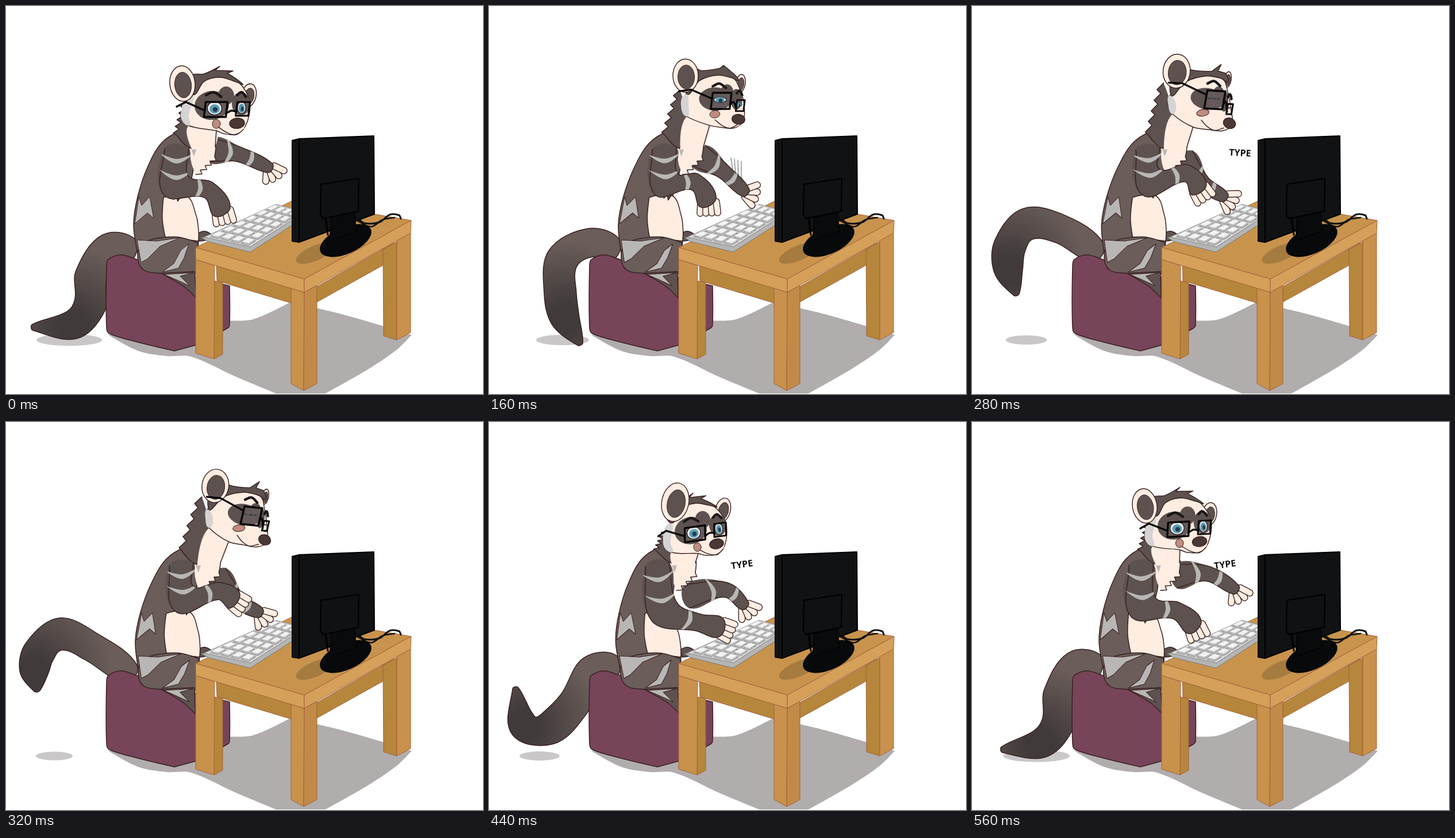
Write an HTML page with a canvas that moves like this. It is 830 by 675 pixels and loops after 0.64 s.

```html
<!DOCTYPE html>
<html lang="en">
<head>
<meta charset="utf-8">
<title>Typing</title>
<style>
html, body { margin: 0; width: 100%; height: 100%; overflow: hidden; background: #fff; }
canvas { display: block; }
</style>
</head>
<body>
<canvas id="stage" width="830" height="675"></canvas>
<script>
const ctx = document.getElementById('stage').getContext('2d');
const INK = '#3a2222', FUR = '#6a5d5a', DARK = '#5d5250', CREAM = '#ffede2', STRIPE = '#b9b7b6';
const BLACK = '#080707', WOOD_LINE = '#a5603a', LEG = '#c8914c', EDGE = '#d5a05a', APRON = '#b5863c';

// Points are "x,y"; a trailing ! marks a sharp corner.
const pts = s => s.split(' ').map(p => {
  const [x, y] = p.split(',').map(parseFloat);
  return { x, y, sharp: p.endsWith('!') };
});
const at = (x, y, sharp = false) => ({ x, y, sharp });
const mix = (a, b, k) =>
  typeof a === 'number' ? a + (b - a) * k :
  Array.isArray(a) ? a.map((v, i) => mix(v, b[i], k)) :
  typeof a === 'object' ? Object.fromEntries(Object.keys(a).map(n => [n, mix(a[n], b[n], k)])) : a;

// Two views of the head; ovals are [x, y, rx, ry, turn], lenses [x, y, width, height].
const frontView = {
  face: pts('322,155 345,130 372,124 402,131 418,150 425,172 417,208 400,223 378,222 366,217 318,208 304,190'),
  crown: pts('322,122 345,118 372,105! 364,112! 395,113! 385,117! 412,136 400,132 372,124 345,131 324,154'),
  ear: [307, 135, 22, 31, -.1], far: [422, 156, 13, 21, .25],
  masks: [[358, 173, 30, 25, -.1], [409, 170, 16, 20, 0], [383, 156, 14, 16, 0]],
  muzzle: [393, 206, 23, 17, 0], nose: [402, 204, 13, 9, -.1], tongue: [366, 205, 7, 8, 0],
  mouth: pts('370,211 384,220 400,224 413,215'),
  lensL: [365, 180, 38, 26], lensR: [412, 179, 22, 24],
  temple: pts('297,175! 313,167! 346,182!'), nape: at(314, 168)
};
const sideView = {
  face: pts('338,160 360,136 395,122 430,126 440,148 448,180 450,206 434,217 410,216 382,213 345,192 336,175'),
  crown: pts('352,100 372,112 410,113! 426,100! 421,112! 434,115! 440,130 428,125 400,122 365,134 340,158'),
  ear: [348, 116, 24, 30, .05], far: [439, 126, 6, 14, .1],
  masks: [[405, 162, 30, 19, .1], [435, 165, 7, 18, 0], [424, 152, 10, 13, 0]],
  muzzle: [428, 202, 21, 13, .2], nose: [446, 203, 11, 9, .3], tongue: [398, 187, 11, 6, -.2],
  mouth: pts('396,200 406,210 420,217 436,212'),
  lensL: [418, 163, 32, 32], lensR: [445, 178, 9, 18],
  temple: pts('335,137! 360,137! 403,155!'), nape: at(326, 138)
};

// head: nose position, tilt in degrees, size, turn to the side, nod
// arms: joints, then the angle of the hand in degrees
const pose = (time, lean, [x, y, tilt, size, turn, nod], near, nearHand, far, farHand, tail, shadow) =>
  ({ time, lean, head: { x, y, tilt, size, turn, nod }, near: pts(near), nearHand, far: pts(far), farHand, tail: pts(tail), shadow });
const poses = [
  pose(0, 0, [402, 204, 0, 1, 0, 0], '296,312 352,320 377,357', 78, '355,250 405,258 460,282', 60,
    '222,422 180,420 148,470 146,520 115,555 46,559', [110, 57]),
  pose(80, 5, [410, 203, 6, .96, .08, 0], '303,310 355,312 378,352', 80, '358,255 408,260 446,278', 20,
    '222,422 175,420 138,460 124,510 112,556 78,588', [108, 53]),
  pose(160, 9, [434, 197, 0, .95, .6, 0], '309,310 358,306 382,341', 88, '365,260 408,288 447,325', 15,
    '222,422 175,412 128,440 124,500 133,545 159,588', [128, 46]),
  pose(240, 11, [446, 203, 0, 1, 1, 0], '313,305 375,288 393,327', 80, '368,262 400,305 438,334', 15,
    '222,420 160,385 100,389 74,435 78,485 101,536', [105, 40]),
  pose(320, 9, [450, 205, 6, .97, 1, 0], '311,308 370,294 398,310', 35, '366,268 405,312 443,333', 50,
    '218,438 150,392 95,369 58,400 49,435 54,468', [84, 32]),
  pose(440, -5, [396, 212, -8, .94, 0, 1], '305,330 365,349 404,358', 25, '345,303 412,292 446,320', 55,
    '222,422 180,430 148,490 102,534 60,528 46,463', [88, 35]),
  pose(560, -3, [396, 208, -3, .97, 0, 0], '298,322 355,328 388,356', 68, '355,268 410,264 460,292', 62,
    '222,422 182,422 152,475 149,525 118,560 52,570', [112, 58])
];

function trace(list, closed) {
  const n = list.length;
  const get = i => closed ? list[(i + n) % n] : list[Math.max(0, Math.min(n - 1, i))];
  const handle = (i, reach) => {
    const p = get(i), a = get(i - 1), b = get(i + 1);
    const k = p.sharp ? 0 : reach / 3 / (Math.hypot(b.x - a.x, b.y - a.y) || 1);
    return [p.x + (b.x - a.x) * k, p.y + (b.y - a.y) * k];
  };
  ctx.beginPath();
  ctx.moveTo(list[0].x, list[0].y);
  for (let i = 0; i < (closed ? n : n - 1); i++) {
    const a = get(i), b = get(i + 1), d = Math.hypot(b.x - a.x, b.y - a.y);
    ctx.bezierCurveTo(...handle(i, d), ...handle(i + 1, -d), b.x, b.y);
  }
}
function paint(fill, stroke, width) {
  if (fill) { ctx.fillStyle = fill; ctx.fill(); }
  if (stroke) { ctx.strokeStyle = stroke; ctx.lineWidth = width; ctx.stroke(); }
}
const list = p => typeof p === 'string' ? pts(p) : p;
function line(points, color = INK, width = 1.5) {
  trace(list(points), false);
  paint(null, color, width);
}
function shape(points, fill, stroke = INK, width = 1.5) {
  trace(list(points), true);
  paint(fill, stroke, width);
}
function openShape(points, fill) {
  shape(points, fill, null);
  line(points);
}
function poly(s, fill, stroke, width = 1) {
  shape(pts(s).map(p => ({ ...p, sharp: true })), fill, stroke, width);
}
function oval([x, y, rx, ry, turn = 0], fill, stroke, width = 1.5) {
  ctx.beginPath();
  ctx.ellipse(x, y, rx, ry, turn, 0, 7);
  paint(fill, stroke, width);
}
function within(matrix, draw) {
  ctx.save();
  ctx.transform(matrix.a, matrix.b, matrix.c, matrix.d, matrix.e, matrix.f);
  draw();
  ctx.restore();
}
// Pointed tufts from a to b.
function fur(a, b, count, size) {
  const dx = b.x - a.x, dy = b.y - a.y, len = Math.hypot(dx, dy), tufts = [];
  for (let i = 0; i < count; i++) {
    const root = i / count, tip = (i + .75) / count;
    tufts.push(at(a.x + dx * root, a.y + dy * root, true),
      at(a.x + dx * tip - dy / len * size, a.y + dy * tip + dx / len * size, true));
  }
  return [...tufts, { ...b, sharp: true }];
}
function normal(joints, i) {
  const a = joints[Math.max(0, i - 1)], b = joints[Math.min(joints.length - 1, i + 1)];
  const len = Math.hypot(b.x - a.x, b.y - a.y);
  return at((b.y - a.y) / len, (a.x - b.x) / len);
}
// Outline of a limb: its joints widened to both sides.
function limb(joints, widths) {
  const side = dir => joints.map((p, i) => {
    const n = normal(joints, i), w = widths[i] / 2 * dir;
    return at(p.x + n.x * w, p.y + n.y * w);
  });
  return [...side(1), ...side(-1).reverse()];
}

function drawTail(joints) {
  const outline = limb(joints, [36, 50, 56, 56, 50, 10]);
  const { x, y } = joints[4], shade = ctx.createRadialGradient(x, y, 25, x, y, 135);
  shade.addColorStop(0, '#403a3a');
  shade.addColorStop(1, FUR);
  const [root, bend] = outline;
  shape(fur(mix(root, bend, .1), mix(root, bend, .75), 3, 9), FUR);
  shape(outline, shade);
}
function drawTorso() {
  shape('302,218 270,239 246,281 229,332 222,380 228,425 236,457! 290,462! 330,462! 335,405 330,375 315,335 325,290 330,215', FUR);
  shape('274,333! 314,330 331,365 335,390 335,409! 277,402! 272,370', CREAM);
  poly('231,332 236,347 250,332 257,369 246,360 224,379 228,354', STRIPE);
  shape('229,430 240,412 265,404 300,402 334,412! 334,466! 270,465 238,458', FUR);
  poly('228,407 262,409 303,403 268,418 246,440 235,446', STRIPE);
  poly('318,414 304,425 292,448 272,463 300,456 310,438', STRIPE);
  shape('270,465! 328,462! 331,508! 312,490 290,476', DARK);
  poly('275,467 326,464 303,470 320,487 296,476', STRIPE);
}
function drawTable() {
  poly('330,420 500,338 705,373 519,475', '#c8934d', WOOD_LINE);
  oval([538, 430, 36, 13, -.4], '#a57b40');
  poly('366,452 497,490 497,517 367,478', APRON, WOOD_LINE);
  poly('541,488 675,412 674,441 541,515', APRON, WOOD_LINE);
  poly('362,478 377,481 377,606 362,614', APRON, WOOD_LINE);
  poly('330,441 363,452 362,614 330,604', LEG, WOOD_LINE);
  poly('496,491 519,498 518,669 496,657', LEG, WOOD_LINE);
  poly('519,498 541,486 541,657 518,669', '#c18a48', WOOD_LINE);
  poly('656,424 680,410 680,581 657,574', APRON, WOOD_LINE);
  poly('680,408 704,394 704,568 680,581', LEG, WOOD_LINE);
  poly('330,420 519,475 519,498 330,441', EDGE, WOOD_LINE);
  poly('519,475 705,373 704,395 519,498', EDGE, WOOD_LINE);
}
function drawKeyboard() {
  poly('340,403 347,402 425,419 520,358 520,367 425,428 352,410', '#b5b5b5', '#777');
  poly('345,402 470,345 520,358 425,419', '#dcdcdc', '#888');
  const spot = (u, v) => `${347 + 123 * u + 78 * v - 28 * u * v},${402 - 57 * u + 17 * v - 4 * u * v}`;
  for (let i = 0; i < 6; i++) for (let j = 0; j < 4; j++) {
    const u = .03 + i * .16, v = .07 + j * .23;
    const key = [spot(u, v), spot(u + .12, v), spot(u + .12, v + .17), spot(u, v + .17)].join(' ');
    poly(key, '#c4c4c4', '#a4a4a4', 2);
    within(new DOMMatrix().translate(0, -3), () => poly(key, '#f3f3f3', '#a4a4a4', .8));
  }
}
function drawMonitor() {
  line('612,370 625,378 650,376 668,363 684,364 687,370', '#111', 3);
  line('612,374 635,384 655,372 676,368', '#111', 2.5);
  poly('498,234 510,231 640,226 641,362 510,411 498,409', '#111214', '#000', 2);
  line('510,232! 510,411!', '#000', 2);
  oval([591, 408, 48, 23, -.42], '#08090a');
  poly('566,362 606,354 610,392 563,408', '#090a0b', '#000');
  poly('548,310 614,300 613,357 552,370 547,364', '#101113', '#000', 2);
  line('556,368! 560,398!', '#000', 3);
}
function drawBib() {
  const edge = [...fur(at(330, 293), at(363, 262), 4, 7), at(365, 242), at(360, 222)];
  shape([at(318, 220, true), at(322, 270), ...edge], CREAM, null);
  line(edge);
  shape('296,222! 312,228 327,262! 332,240 322,222!', STRIPE, null);
}
function drawHand(wrist, degrees, spacing, fan, length) {
  const aim = degrees * Math.PI / 180;
  for (const i of [1.5, .5, -.5, -1.5]) {
    const a = aim + i * fan;
    const base = at(wrist.x - Math.sin(aim) * i * spacing, wrist.y + Math.cos(aim) * i * spacing);
    const finger = [base, at(base.x + Math.cos(a) * length, base.y + Math.sin(a) * length)];
    line(finger, INK, 12.5);
    line(finger, CREAM, 9.8);
  }
}
// Pale bands lie across the arm at the given joint positions.
function drawArm(joints, widths, bands) {
  const outline = limb(joints, widths);
  openShape(outline, DARK);
  ctx.save();
  trace(outline, true);
  ctx.clip();
  for (const band of bands) {
    const i = Math.floor(band), p = mix(joints[i], joints[i + 1], band - i), n = normal([joints[i], joints[i + 1]], 0);
    const spot = (across, along) => at(p.x + n.x * across - n.y * along, p.y + n.y * across + n.x * along);
    shape([{ ...spot(30, -8), sharp: true }, spot(0, 2), { ...spot(-30, -8), sharp: true }, spot(0, 10)], STRIPE, null);
  }
  ctx.restore();
}
function drawEye([x, y, w, h], open) {
  const rx = w * .33, ry = Math.max(.5, h * .44 * open), eye = [x - 2, y - 2, rx, ry];
  oval(eye, '#fff', '#1c1717', 1.5);
  ctx.save();
  oval(eye);
  ctx.clip();
  oval([x - 2, y - 1, rx * .7, 8], '#4d9db8');
  oval([x - 1, y, rx * .32, 4], '#16303c');
  ctx.restore();
}
function drawLens([x, y, w, h], width) {
  const corner = (i, j) => `${x + i * w / 2 - j * h * .06},${y + j * h / 2}`;
  poly([corner(-1, -1), corner(1, -1), corner(1, 1), corner(-1, 1)].join(' '), 'rgba(160,150,165,.12)', BLACK, width);
}
function drawBrow([x, y, w, h]) {
  const top = y - h / 2;
  line([at(x - w * .45, top - 12), at(x - w * .1, top - 17), at(x + w * .25, top - 9)], '#1c1717', 4.5);
}
function drawEar(ear) {
  const [x, y, rx, ry, turn] = ear;
  oval(ear, CREAM, INK);
  oval([x + rx * .05, y + ry * .08, rx * .66, ry * .72, turn], DARK, INK, 1);
}
function drawHead({ x, y, tilt, size, turn, nod }, lean) {
  const h = mix(frontView, sideView, turn), [noseX, noseY] = h.nose;
  const matrix = new DOMMatrix().translate(x, y).rotate(tilt).scale(size).translate(-noseX, -noseY);
  const onHead = p => { const q = matrix.transformPoint(p); return at(q.x, q.y); };
  h.ear = mix(h.ear, [h.ear[0] + 30, h.ear[1] - 18, 25, 36, .35], nod);
  h.far = mix(h.far, [h.far[0], h.far[1] - 12, 14, 23, .4], nod);

  const throat = onHead(h.face[9]), cheek = onHead(h.face[10]);
  const nape = fur(onHead(h.nape), at(298 + lean, 226), 5, 8);
  openShape([...nape, at(326 + lean, 246), cheek], DARK);
  shape([throat, at(364 + lean, 245, true), at(324 + lean, 250, true), cheek], CREAM, null);
  line([throat, at(364 + lean, 245)]);

  within(matrix, () => {
    drawEar(h.far);
    shape(h.face, CREAM);
    shape([h.face[0], h.face[11], h.face[10], at(h.face[11].x + 14, h.face[11].y)], '#d5d3d3', null);
    shape(h.crown, DARK);
    drawEar(h.ear);
    h.masks.forEach(m => oval(m, DARK));
    oval(h.muzzle, CREAM);
    drawEye(h.lensL, 1 - turn);
    drawEye(h.lensR, 1 - turn);
    drawBrow(h.lensL);
    drawBrow(h.lensR);
    oval(h.tongue, '#bd8d7e', INK, 1);
    line(h.mouth);
    oval(h.nose, '#4a3836', INK);
    drawLens(h.lensL, 3.6);
    drawLens(h.lensR, 3);
    line(h.temple, BLACK, 3.4);
    const [lx, ly, lw] = h.lensL, [rx, ry, rw] = h.lensR;
    line([at(lx + lw / 2, ly + 6), at((lx + lw / 2 + rx - rw / 2) / 2, ly + 2), at(rx - rw / 2, ry + 5)], BLACK, 3.4);
  });
}
function drawWord(x, y, degrees) {
  within(new DOMMatrix().translate(x, y).rotate(degrees), () => {
    ctx.fillStyle = '#111';
    ctx.font = '700 16px "Open Sans", sans-serif';
    ctx.fillText('TYPE', 0, 0);
  });
}

function draw(t) {
  const next = poses.findIndex(p => p.time > t);
  const b = poses.at(next), a = next < 0 ? b : poses[next - 1];
  const p = a === b ? a : mix(a, b, (t - a.time) / (b.time - a.time));
  // Shears everything above the hips.
  const leaning = new DOMMatrix([1, 0, -p.lean / 240, 1, 460 * p.lean / 240, 0]);
  ctx.fillStyle = '#fff';
  ctx.fillRect(0, 0, 830, 675);
  ctx.lineJoin = ctx.lineCap = 'round';

  const [shadowX, shadowR] = p.shadow;
  oval([shadowX, 581, shadowR, 4 + shadowR / 9], '#c9c7c7');
  shape('178,572! 230,600 280,609 322,610 400,645 470,674! 556,674! 630,632 680,598 706,572! 640,552 580,535 495,515! 430,545 385,547!', '#b1adad', null);
  drawTail(p.tail);
  shape('175,452 178,441 200,433 225,440 290,462! 389,487! 389,555 386,560 330,590! 293,600! 230,585 180,570 175,560', '#77445a');
  shape('333,396! 347,392 358,402 336,409!', DARK);
  within(leaning, drawTorso);
  drawTable();
  drawKeyboard();
  drawMonitor();

  drawHand(p.far[2], p.farHand, 5, .4, 19);
  drawArm(p.far, [42, 26, 17], [.6, 1.3]);
  within(leaning, drawBib);
  drawHead(p.head, p.lean);

  const near = [at(297 + p.lean * .9, 248), ...p.near], elbow = near[1];
  drawHand(near[3], p.nearHand, 9, .06, 19);
  shape(fur(at(elbow.x - 22, elbow.y + 8), at(elbow.x + 8, elbow.y + 20), 4, 9), DARK);
  drawArm(near, [42, 54, 30, 32], [.25, .7, 1.65]);

  if (t === 160) for (let i = 0; i < 4; i++) line(`${421 + i * 6},${264 + i * 2} ${424 + i * 5},${286 + i * 7}`, '#333', .8);
  if (t >= 240 && t < 320) drawWord(447, 260, 3);
  if (t >= 440) drawWord(422, 256, -8);
}

function frame(now) {
  const t = now % 640, step = t < 160 || t >= 480 ? 80 : 40;
  draw(Math.floor(t / step) * step);
  requestAnimationFrame(frame);
}
requestAnimationFrame(frame);
</script>
</body>
</html>
```
